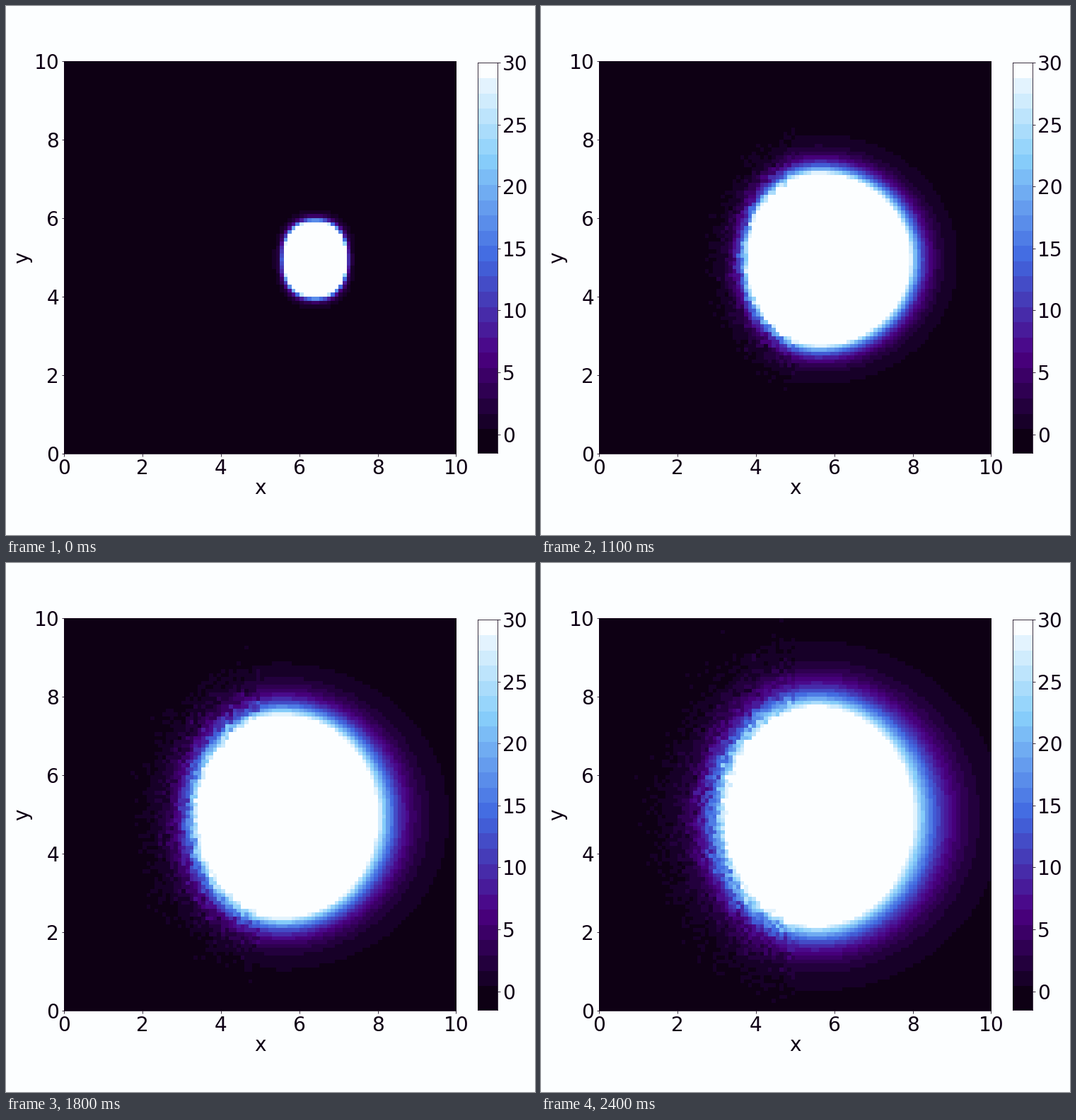
A matplotlib script that plays this animation: 748 px wide and 748 px high, repeating every 2.5 s.

```python
import numpy as np
import matplotlib.pyplot as plt
from matplotlib.animation import FuncAnimation
from matplotlib.colors import BoundaryNorm, LinearSegmentedColormap, ListedColormap

SIZE, DPI = 748, 64
PT = 72 / DPI                      # points per pixel
FRAMES, STEP = 25, 100
CELLS = 100
LEFT, RIGHT, TOP, BOTTOM = 82.2, 636.4, 78.4, 632.6
CELL = (RIGHT - LEFT) / CELLS
CENTER_Y = 358.2
VMIN, VMAX, BANDS = -1.5, 30, 25
PAPER, INK = "#fcfeff", "#0e0014"
HIGH, LOW = 28.6, 0.42             # densities on the inner and outer contour
PER_UNIT = 4                       # particles per unit of density

plt.rcParams.update({"font.family": "DejaVu Sans", "font.size": 28 * PT})

# Even colour bands above a slightly taller lowest one
edges = np.append(VMIN, np.linspace(LOW, VMAX, BANDS))
middles = (edges[1:] + edges[:-1]) / 2
ramp = LinearSegmentedColormap.from_list(
    "ramp", ["black", "indigo", "royalblue", "lightskyblue", "white"])
colors = list(ramp((middles - VMIN) / (VMAX - VMIN)))
colors[0], colors[-1] = INK, PAPER
cmap = ListedColormap(colors)
norm = BoundaryNorm(edges, cmap.N, clip=True)

centers = (np.arange(CELLS) + 0.5) * CELL
X, Y = np.meshgrid(LEFT + centers, BOTTOM - centers)


def settle(start, gain, tau, t):
    return start + gain * (1 - np.exp(-t / tau))


def oval(dx, dy, left, right, vert, power):
    """Squared radius relative to an oval with unequal left and right halves."""
    a = np.where(dx < 0, left, right)
    u = np.abs(dx / a) ** power + np.abs(dy / vert) ** power
    return np.maximum(u ** (2 / power), 1e-6)


def density(i):
    t = i * STEP / 1000
    dx = X - settle(437, -48, 0.43, t)
    dy = Y - CENTER_Y
    power = 2 + 0.35 * np.exp(-t / 0.25)
    # The core slows down while the halo keeps diffusing outwards
    inner = oval(dx, dy, settle(44, 105, 1.39, t), settle(43, 96, 0.47, t),
                 settle(53, 125, 1.38, t), power)
    outer = oval(dx, dy, settle(59, 300, 3.1, t), 57 + 133 * t ** 0.5,
                 70 + 100 * t ** 0.65, power)
    fall = (1 - 1 / inner) / (1 / outer - 1 / inner)
    n = HIGH * np.exp(np.clip(-fall * np.log(HIGH / LOW), -20, 4))
    # The left half is made of discrete particles
    half = CELLS // 2
    rng = np.random.default_rng(100 + i)
    n[:, :half] = rng.poisson(PER_UNIT * n[:, :half]) / PER_UNIT
    return n


def add_axes(left, top, right, bottom):
    ax = fig.add_axes([left / SIZE, 1 - bottom / SIZE,
                       (right - left) / SIZE, (bottom - top) / SIZE])
    ax.tick_params(length=3.5 * PT, width=0.8 * PT, pad=3.5 * PT,
                   color=INK, labelcolor=INK)
    for spine in ax.spines.values():
        spine.set(linewidth=0.8 * PT, edgecolor=INK)
    return ax


def label(x, y, text, **kw):
    fig.text(x / SIZE, 1 - y / SIZE, text, color=INK, ha="center",
             va="baseline", rotation_mode="anchor", **kw)


fig = plt.figure(figsize=(SIZE / DPI, SIZE / DPI), dpi=DPI, facecolor=PAPER)

ax = add_axes(LEFT, TOP, RIGHT, BOTTOM)
image = ax.imshow(density(0), cmap=cmap, norm=norm, origin="lower",
                  extent=(0, 10, 0, 10), interpolation="nearest", aspect="auto")
ax.set_xticks(range(0, 11, 2))
ax.set_yticks(range(0, 11, 2))
label((LEFT + RIGHT) / 2, 690, "x")
label(31, (TOP + BOTTOM) / 2, "y", rotation=90)

bar = add_axes(667, 80.4, 695, 631.8)
bar.pcolormesh([0, 1], edges, middles[:, None], cmap=cmap, norm=norm)
bar.set(xlim=(0, 1), ylim=(VMIN, VMAX), xticks=[], yticks=range(0, 31, 5))
bar.yaxis.tick_right()


def update(i):
    image.set_data(density(i))
    return [image]


anim = FuncAnimation(fig, update, frames=FRAMES, interval=STEP,
                     repeat=True, repeat_delay=0, blit=False)
plt.show()
```
